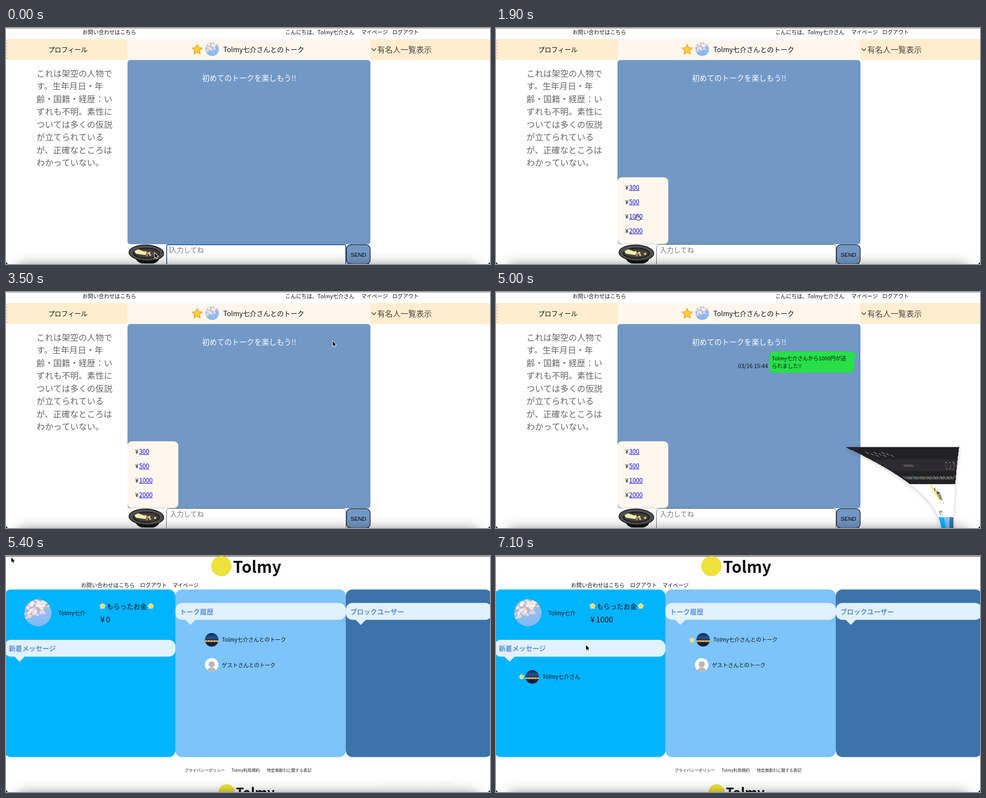
Animation, 1000 px wide and 490 px high, one loop 7200 ms. Source, as an HTML page with a canvas:

```html
<!DOCTYPE html>
<html lang="ja">
<head>
<meta charset="utf-8">
<style>
html, body { margin: 0; width: 100%; height: 100%; overflow: hidden; background: #fff; }
canvas { display: block; }
</style>
</head>
<body>
<canvas id="stage" width="1000" height="490"></canvas>
<script>
const LOOP = 7200, STEP = 100, W = 1000, H = 490, BAR = 76;
const JP = '"Noto Sans CJK JP", "Noto Sans CJK", sans-serif';
const BRAND = 'Tolmy', USER = 'Tolmy七介', TALK = USER + 'さんとのトーク';
const stage = document.getElementById('stage').getContext('2d');
const win = Object.assign(document.createElement('canvas'), { width: W, height: BAR + H });
const winCtx = win.getContext('2d');
let c = stage;

// Value at time t from rows of [time, ...values]
function track(rows, t) {
  let i = rows.findIndex(r => r[0] > t);
  if (i < 0) return rows[rows.length - 1].slice(1);
  if (i === 0) return rows[0].slice(1);
  const [a, b] = [rows[i - 1], rows[i]], p = (t - a[0]) / (b[0] - a[0]);
  return a.slice(1).map((v, k) => v + (b[k + 1] - v) * p);
}

// y is the middle of the capitals
function text(s, x, y, size, color = '#111', weight = 400, family = JP) {
  c.font = `${weight} ${size}px ${family}`;
  c.fillStyle = color;
  c.fillText(s, x, y + size * 0.37);
}

function rect(x, y, w, h, color) {
  c.fillStyle = color;
  c.fillRect(x, y, w, h);
}

function box(x, y, w, h, r, fill, stroke, width = 1) {
  c.beginPath();
  c.roundRect(x, y, w, h, r);
  paint(fill, stroke, width);
}

function paint(fill, stroke, width = 1) {
  if (fill) { c.fillStyle = fill; c.fill(); }
  if (stroke) { c.strokeStyle = stroke; c.lineWidth = width; c.stroke(); }
}

function oval(x, y, rx, ry, fill, stroke, width, turn = 0) {
  c.beginPath();
  c.ellipse(x, y, rx, ry, turn, 0, 7);
  paint(fill, stroke, width);
}

const dot = (x, y, r, fill) => oval(x, y, r, r, fill);

function poly(points, fill, stroke, width) {
  c.beginPath();
  for (let i = 0; i < points.length; i += 2) c.lineTo(points[i], points[i + 1]);
  c.closePath();
  paint(fill, stroke, width);
}

function star(x, y, r, fill, stroke) {
  const pts = [];
  for (let i = 0; i < 10; i++) {
    const a = i * Math.PI / 5 - Math.PI / 2, d = i % 2 ? r * 0.48 : r;
    pts.push(x + d * Math.cos(a), y + d * Math.sin(a));
  }
  poly(pts, fill, stroke, r / 8);
}

function glowStar(x, y, r) {
  dot(x, y, r * 0.75, '#f8efb0');
  star(x, y, r * 0.95, '#f9d75a', '#f3e9a2');
}

function shade(y0, y1, ...colors) {
  const g = c.createLinearGradient(0, y0, 0, y1);
  colors.forEach((col, i) => g.addColorStop(i / (colors.length - 1), col));
  return g;
}

function clipCircle(x, y, r, draw) {
  c.save();
  c.beginPath();
  c.arc(x, y, r, 0, 7);
  c.clip();
  draw();
  c.restore();
}

function blossom(x, y, r) {
  clipCircle(x, y, r, () => {
    rect(x - r, y - r, 2 * r, 2 * r, shade(y - r, y + r, '#9cc0ee', '#85baf5'));
    for (let i = 0; i < 75; i++) {
      const u = (i * 0.618) % 1, v = (i * i * 0.377) % 1;
      dot(x + r * (1.9 * u - 1), y - r + r * v * (1.6 - 0.8 * u), r * 0.12,
        ['#f6e9ea', '#e6d5da', '#fbf3f2', '#c3b3ba'][i % 4]);
    }
  });
}

function night(x, y) {
  clipCircle(x, y, 14, () => {
    rect(x - 14, y - 14, 28, 28, shade(y - 14, y + 14, '#0b2152', '#28548e', '#17223c', '#101c3a'));
    rect(x - 14, y + 1, 28, 3.5, '#c79a4a');
    for (let i = -2; i < 3; i++) rect(x + i * 6 - 1, y + 1.5, 2, 2.5, '#f7dfa0');
  });
}

function guest(x, y) {
  clipCircle(x, y, 14, () => {
    rect(x - 14, y - 14, 28, 28, '#fff');
    dot(x, y - 1, 6.5, '#b9b9b9');
    oval(x, y + 13, 9.5, 7.5, '#b9b9b9');
  });
}

function hat() {
  box(267, 470, 51, 19, [0, 0, 16, 16], '#151515');
  oval(290, 467, 36, 16.5, '#505050', '#111', 1.5, 0.04);
  oval(290, 467.5, 27, 10.5, '#3a3a3a', '#111', 1.5);
  oval(292, 469, 20, 7, '#4d4438');
  poly([265, 463, 273, 459, 292, 466, 288, 472, 268, 469], '#f4eeb0', '#333', 0.8);
  for (let i = 0; i < 8; i++)
    dot(288 + (i * 5) % 22, 465 + (i * 3) % 8, 2.2, ['#ecd894', '#b98d4c', '#ddd6c8', '#5a4632'][i % 4]);
}

function chatPage(menu, sent) {
  rect(0, 0, W, H, '#fff');
  rect(0, 0, W, 1, '#999');
  text('お問い合わせはこちら', 158, 9, 11.1);
  text(`こんにちは、${USER}さん`, 577, 9, 11.1);
  text('マイページ', 734, 9, 11);
  text('ログアウト', 798, 9, 11);

  rect(0, 23, 251, 43.5, '#ffedcf');
  rect(251, 23, 502, 43.5, '#fff7ed');
  rect(753, 23, 247, 43.5, '#ffedcf');
  for (let y = 25; y < 65; y += 6) rect(0, y, 3, 3, '#e2d5c0');
  text('プロフィール', 87, 44.5, 13.6);
  star(395, 45, 11, '#fbcf3c', '#ef9f28');
  blossom(426, 44, 14);
  text(TALK, 449, 44.5, 14.1);
  c.beginPath();
  c.moveTo(755.5, 42.5); c.lineTo(760, 47); c.lineTo(764.5, 42.5);
  paint(null, '#333', 1.5);
  text('有名人一覧表示', 767, 45, 16.1, '#444');

  ['これは架空の人物で', 'す。生年月日・年', '齢・国籍・経歴：い', 'ずれも不明。素性に',
    'ついては多くの仮説', 'が立てられている', 'が、正確なところは', 'わかっていない。']
    .forEach((line, i) => text(line, 63, 94.5 + i * 26.45, 17.4, '#666'));

  box(251, 66.5, 502, 382.5, 6, '#7298c5');
  text('初めてのトークを楽しもう!!', 405, 104.5, 15.4, '#fff');
  if (sent) {
    text('03/16 15:44', 500, 153.5, 11.6);
    poly([732, 132, 738, 128, 747, 128.5, 741, 137, 736, 142], '#27e048');
    box(565, 123.5, 175, 44, 9, '#27e048');
    text(`${USER}さんから1000円が送`, 570, 137.5, 10.9);
    text('られました!!', 570, 153.5, 10.9);
  }
  if (menu) {
    box(251, 310, 105, 138.5, 9, '#fff7ed');
    [300, 500, 1000, 2000].forEach((n, i) => {
      const y = 331.5 + i * 30;
      text('¥', 267, y, 12.4);
      text(n, 275, y, 12.6, '#0000ee');
      rect(275, y + 5.5, c.measureText(n).width, 1, '#0000ee');
    });
  }

  hat();
  if (menu) box(331.5, 449.5, 371, 50, 6, '#fff', '#666');
  else {
    box(332, 450, 370, 50, 3, '#fff', '#2f68ad', 2);
    rect(338.5, 453, 1, 14, '#333');
  }
  text('入力してね', 339, 460.5, 14, '#777');
  box(703.5, 450, 49, 40.5, 9, '#7298c5', '#2b2b2b', 1.5);
  text('SEND', 712, 470.5, 11.6, '#000', 400, '"Liberation Sans", sans-serif');
}

function toolbar() {
  rect(0, 0, W, BAR, '#222226');
  rect(0, 26, W, 24, '#2b2b30');
  for (let i = 0; i < 9; i++) rect(90 + i * 26, 10 + (i % 3) * 3, 14, 4, '#77777c');
  for (let i = 0; i < 8; i++) rect(300 + i * 16, 36, 10, 5, '#66666c');
  for (let i = 0; i < 3; i++) box(850 + i * 45, 32, 22, 14, 3, null, '#ccc');
  for (let i = 0; i < 46; i++)
    rect(60 + i * 20, 60 + (i % 3), 9, 6, ['#aaa', '#62b878', '#777', '#c98a58', '#ddd', '#6d8fc0'][i * 7 % 6]);
}

function panel(x, w, color, title, barY) {
  box(x, 69.5, w, 348, 14, color);
  box(x, barY, w, 35, 14, '#e2f1ff');
  const tip = Math.max(x, -3) + 20;
  poly([tip, barY + 34.5, tip + 22, barY + 34.5, tip + 11, barY + 45.5], '#e2f1ff');
  text(title, x + 9.2, barY + 18, 13.9, '#5a92d2', 700);
}

function homePage(paid) {
  rect(0, 0, W, H, '#fff');
  rect(0, 0, W, 1, '#333');
  dot(445, 21, 21, '#eee23c');
  text(BRAND, 469, 22.5, 33, '#111', 700);
  text('お問い合わせはこちら', 155, 61, 11.1);
  text('ログアウト', 277, 61, 11.1);
  text('マイページ', 344, 61, 10.8);

  panel(-3.5, 353.5, '#00b4ff', '新着メッセージ', 174);
  panel(350, 352, '#7cc4f9', 'トーク履歴', 97.5);
  panel(702, 302, '#3b74ab', 'ブロックユーザー', 97.5);

  blossom(66, 118, 28);
  text(USER, 108, 118.5, 11.5);
  glowStar(199.5, 104, 7);
  text('もらったお金', 208, 104.5, 13.8);
  glowStar(299, 104, 7);
  text('¥', 195, 132.5, 16);
  text(paid ? '1000' : '0', 206.5, 132.5, 16);

  const dx = paid ? 3 : 0;
  night(425 + dx, 174);
  text(TALK, 446 + dx, 174, 11.2);
  guest(425, 226);
  text('ゲストさんとのトーク', 446, 226.5, 11.1);
  if (paid) {
    glowStar(405, 174.5, 6);
    glowStar(53, 251, 6);
    night(75, 251);
    text(USER + 'さん', 96, 251, 11.4);
  }

  text('プライバシーポリシー', 369, 445, 8.3, '#222');
  text(BRAND + '利用規約', 466, 445, 8.5, '#222');
  text('特定商取引に関する表記', 539, 445, 8.4, '#222');
  dot(456, 491, 17, '#eee23c');
  text(BRAND, 475, 491, 26.5, '#111', 700);
}

// Left and right window edge on screen row y while it is pulled from the dock
function edges(y, pull) {
  const p = Math.min(1, Math.max(0, (y + 70) / 565));
  const s = pull * (1 - Math.cos(Math.PI * p)) / 2;
  return [920 * s, W - 55 * s];
}

function drawWindow(shift, pull, paid) {
  c = winCtx;
  toolbar();
  c.save();
  c.translate(0, BAR);
  homePage(paid);
  c.restore();
  c = stage;
  const top = Math.max(0, Math.round(shift - BAR));
  if (pull > 0) {
    const left = [], right = [];
    for (let y = top; y <= H + 10; y += 5) {
      const [l, r] = edges(y, pull);
      left.push(l, y);
      right.unshift(r, y);
    }
    c.save();
    c.shadowColor = 'rgba(0,0,0,.22)';
    c.shadowBlur = 8;
    c.shadowOffsetY = 2;
    poly([...left, ...right], '#fff');
    c.restore();
  }
  for (let y = top; y < H; y++) {
    const [l, r] = edges(y, pull), row = Math.max(0, Math.round(y - shift + BAR));
    c.drawImage(win, 0, row, W, 1, l, y, r - l, 1);
  }
}

function dockLabel(alpha) {
  c.save();
  c.globalAlpha = alpha;
  poly([850, 480, 862, 480, 856, 487], '#e6e2e5');
  box(774.5, 461.5, 163, 19.5, 4, '#e9e5e8', '#cfcacd');
  text('comments_spec.rb — picttweet', 785, 471, 9.4, '#333', 400, 'Inter, sans-serif');
  c.restore();
}

function dockShadow() {
  c.save();
  c.shadowColor = 'rgba(0,0,0,.45)';
  c.shadowBlur = 26;
  box(25, H + 2, W - 50, 40, 8, '#888');
  c.restore();
  poly([0, 486, 4, 490, 0, 490], '#222');
  poly([W, 486, W - 4, 490, W, 490], '#222');
}

function pointer(x, y, hand) {
  c.save();
  c.translate(x, y);
  c.lineJoin = 'round';
  if (hand) {
    poly([0, 0, 2, 0, 3, 4, 8, 5, 8, 8, 6, 11, 2, 11, -2, 6, -1, 5, 1, 6], '#fff', '#222', 1);
  } else {
    const arrow = [0, 0, 0, 10, 2.3, 8, 4, 11.5, 5.6, 10.8, 4, 7.3, 7, 7.2];
    poly(arrow, null, '#fff', 2);
    poly(arrow, '#000');
  }
  c.restore();
}

const cursorPath = [
  [0, 307, 467], [800, 307, 467], [1500, 290, 388], [2300, 290, 388],
  [3500, 675, 102], [4000, 690, 130], [4700, 930, 498], [5000, 930, 498],
  [5200, 337, 292], [5400, 11, 3], [5500, 2, -20], [6400, 5, -20], [6500, 9, 1], [7100, 186, 185]
];
const windowPath = [ // time, shift, pull
  [4900, 500, 1], [5000, 398, 1], [5100, 150, 1], [5200, 3.5, 1], [5300, 2, 0.4], [5400, 0, 0]
];
const labelPath = [[5000, 0], [5100, 1], [5200, 1], [5300, 0.5], [5400, 0.06], [5500, 0]];

function frame(now) {
  const t = Math.floor(now % LOOP / STEP) * STEP;
  c = stage;
  if (t < 5400) chatPage(t >= 900, t >= 3900);
  if (t >= 4900) drawWindow(...track(windowPath, t), t >= 6100);
  const [alpha] = track(labelPath, t);
  if (alpha) dockLabel(alpha);
  dockShadow();
  pointer(...track(cursorPath, t), t >= 1400 && t < 2400);
  requestAnimationFrame(frame);
}
requestAnimationFrame(frame);
</script>
</body>
</html>
```
